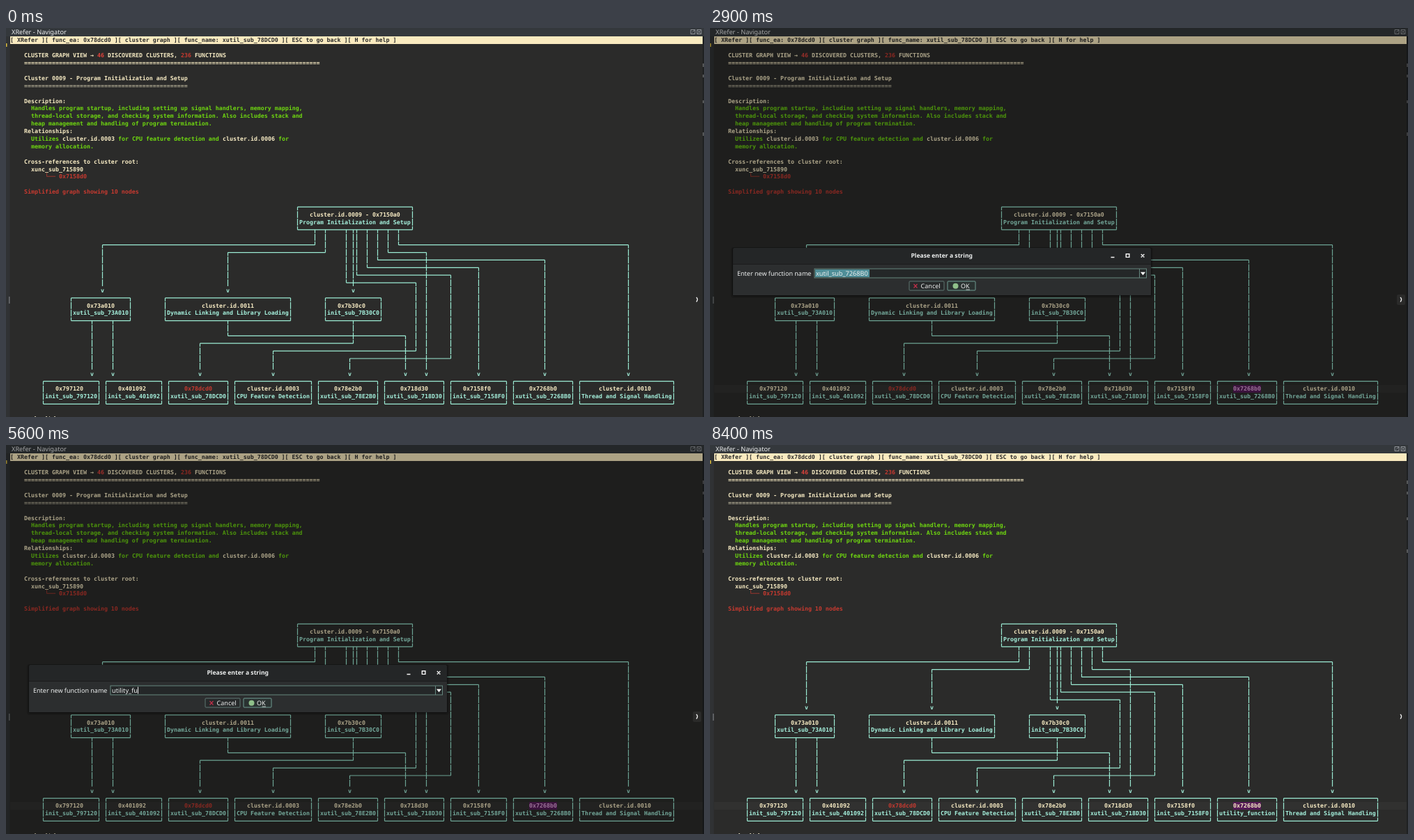
Animation of 1002x559 px, one loop 8.8 s. Source, as an HTML page:

```html
<!DOCTYPE html>
<html lang="en">
<head>
<meta charset="utf-8">
<title>Cluster graph rename</title>
<style>
html, body { margin: 0; width: 100%; height: 100%; overflow: hidden; background: #2b2b2a; }
svg { display: block; width: 1002px; height: 559px; }
text { white-space: pre; }
.mono { font: bold 8.305px "DejaVu Sans Mono", monospace; text-rendering: geometricPrecision; }
.ui { font: 9px "Noto Sans", sans-serif; fill: #eef0f0; text-rendering: geometricPrecision; }
.field { font-size: 9.2px; }
.heading { font-size: 8.6px; font-weight: bold; }
.cream { fill: #f8ecc4; }
.rule { fill: #b5af98; }
.green { fill: #6fd810; }
.red { fill: #c73a30; }
.alert { fill: #e0433c; }
.dark { fill: #2b2b2a; }
.mint { fill: #a6f2de; }
</style>
</head>
<body>
<svg id="stage" viewBox="0 0 1002 559" xmlns="http://www.w3.org/2000/svg">
  <rect width="1002" height="559" fill="#2b2b2a"/>
  <rect width="1002" height="12" fill="#34383c"/>
  <rect y="12" width="5.5" height="547" fill="#303234"/>
  <rect x="1000" y="12" width="2" height="547" fill="#1f2122"/>
  <rect y="22" width="1.5" height="5" fill="#d8b93c"/>
  <rect x="4" y="386" width="1.5" height="10" fill="#6c6f72"/>
  <path d="M1001 51v5M1001 67v4M1001 104v4M1001 150v5" stroke="#8b8d8e"/>
  <text class="ui field" x="8" y="9">XRefer - Navigator</text>
  <path d="M983 2.5h6v6h-6zM985 6.5l4-4M992 2.5h6v6h-6zM993 3.5l4 4M997 3.5l-4 4"
    fill="none" stroke="#a9adb0" stroke-width=".8"/>
  <rect x="6" y="12" width="994" height="11" fill="#f9eabf"/>
  <path d="M41 558.5h2M57 558.5h2M62 558.5h1M69 558.5h2" stroke="#c9c3aa"/>
  <rect id="row" x="6" y="513" width="994" height="11" fill="#313130"/>
  <rect id="mark" x="751" y="513" width="40" height="11" fill="#561c58"/>
  <path id="wires" fill="none" stroke="#9cecd4" stroke-width="1.2"/>
  <!-- The minute turn stops text from snapping to whole pixel rows. -->
  <g id="page" class="mono" transform="rotate(.002)"></g>
  <path id="beam" d="M780.8 513v11" stroke="#fff" stroke-width="1.4"/>
  <rect id="dim" width="1002" height="559"/>
  <rect x="986" y="383" width="12" height="15" rx="2" fill="#2b2b2a"/>
  <path d="M991 387q3.2 3 0 6.5" fill="none" stroke="#f2f2f2" stroke-width="1.3"/>
  <g id="dialog">
    <rect x="30" y="315" width="606" height="73" rx="4" opacity=".18"/>
    <rect x="32" y="315.5" width="602" height="70" rx="3" opacity=".3"/>
    <path d="M33 384V319q0-3 3-3h594q3 0 3 3v65z" fill="#2c2e2f"/>
    <path d="M33 339V319q0-3 3-3h594q3 0 3 3v20z" fill="#242627"/>
    <path d="M33 339.5h600" stroke="#1b1c1d"/>
    <text class="ui heading" x="332.7" y="330.3" text-anchor="middle">Please enter a string</text>
    <path d="M575.5 329.5h5M597.3 324.8h4.6v4.6h-4.6zM618.8 325l4.6 4.6M623.4 325l-4.6 4.6"
      fill="none" stroke="#f5f5f5" stroke-width="1.4"/>
    <text class="ui" x="39" y="356">Enter new function name</text>
    <rect x="150" y="346" width="476.5" height="13" fill="#242728" stroke="#66877f"/>
    <path d="M616.5 346v13" stroke="#66877f"/>
    <path d="M618 350.7h7l-3.5 4.6z" fill="#fff"/>
    <rect id="selection" x="151" y="347" width="78" height="11" fill="#4f8e98"/>
    <text id="entry" class="ui field" x="152" y="356"></text>
    <path id="caret" d="M0 347.5v10" stroke="#fff" stroke-width=".9"/>
    <rect x="286" y="364" width="50" height="13" rx="1" fill="#272a2b" stroke="#5f7773"/>
    <rect x="341" y="364" width="40" height="13" rx="1" fill="#2a3231" stroke="#6f9c92"/>
    <path d="M292.5 368l5 5.5M297.5 368l-5 5.5" stroke="#c2304a" stroke-width="1.2"/>
    <circle cx="352.5" cy="370.7" r="4" fill="#8fc08a"/>
    <text class="ui" x="302.6" y="374.4">Cancel</text>
    <text class="ui" x="360" y="374.4">OK</text>
    <path d="M367.5 376h5.5" stroke="#eef0f0" stroke-width=".8"/>
  </g>
</svg>
<script>
const LOOP = 8800;
const $ = id => document.getElementById(id);
const page = $("page");

// Text and lines share a character grid.
const CELL = 5, LINE = 10.89, BASE = 42.2;

function put(row, col, string, style) {
  const el = document.createElementNS("http://www.w3.org/2000/svg", "text");
  el.setAttribute("x", 6 + CELL * col);
  el.setAttribute("y", (BASE + LINE * row).toFixed(2));
  el.setAttribute("class", style);
  el.textContent = string;
  page.append(el);
  return el;
}

// Consecutive pieces of one row: string, style, string, style ...
function putRun(row, col, ...pieces) {
  for (let i = 0; i < pieces.length; i += 2) {
    put(row, col, pieces[i], pieces[i + 1]);
    col += pieces[i].length;
  }
}

put(-2, 0, "[ XRefer ][ func_ea: 0x78dcd0 ][ cluster graph ][ func_name: xutil_sub_78DCD0 ][ ESC to go back ][ H for help ]", "dark");
putRun(0, 4, "CLUSTER GRAPH VIEW → ", "cream", "46", "alert", " DISCOVERED CLUSTERS, ", "cream", "236", "red", " FUNCTIONS", "cream");
put(1, 4, "=".repeat(85), "cream");
put(3, 4, "Cluster 0009 - Program Initialization and Setup", "cream");
put(4, 4, "=".repeat(47), "rule");
put(6, 4, "Description:", "cream");
put(7, 6, "Handles program startup, including setting up signal handlers, memory mapping,", "green");
put(8, 6, "thread-local storage, and checking system information. Also includes stack and", "green");
put(9, 6, "heap management and handling of program termination.", "green");
put(10, 4, "Relationships:", "cream");
putRun(11, 6, "Utilizes ", "green", "cluster.id.0003", "cream", " for CPU feature detection and ", "green", "cluster.id.0006", "cream", " for", "green");
put(12, 6, "memory allocation.", "green");
put(14, 4, "Cross-references to cluster root:", "cream");
put(15, 6, "xunc_sub_715890", "cream");
put(16, 10, "└── 0x7158d0", "red");
put(18, 4, "Simplified graph showing 10 nodes", "red");

// Each cell holds the sides its line touches.
const UP = 1, RIGHT = 2, DOWN = 4, LEFT = 8;
const cells = Array.from({ length: 47 }, () => new Array(200).fill(0));

function stroke(r0, c0, r1, c1) {
  const dr = Math.sign(r1 - r0), dc = Math.sign(c1 - c0);
  const [out, back] = dr ? (dr > 0 ? [DOWN, UP] : [UP, DOWN])
    : (dc > 0 ? [RIGHT, LEFT] : [LEFT, RIGHT]);
  for (let r = r0, c = c0; r !== r1 || c !== c1;) {
    cells[r][c] |= out;
    r += dr;
    c += dc;
    cells[r][c] |= back;
  }
}

function box(row, left, head, name) {
  const right = left + name.length + 1;
  stroke(row, left, row, right);
  stroke(row, right, row + 3, right);
  stroke(row + 3, right, row + 3, left);
  stroke(row + 3, left, row, left);
  const pad = Math.floor((name.length - head.length) / 2);
  return [
    put(row + 1, left + 1 + pad, head, head === "0x78dcd0" ? "red" : "cream"),
    put(row + 2, left + 1, name, "mint")
  ];
}

// Start column and row, then alternating target rows and columns.
function route(col, row, ...turns) {
  turns.forEach((turn, i) => {
    if (i % 2) { stroke(row, col, row, turn); col = turn; }
    else { stroke(row, col, turn, col); row = turn; }
  });
  cells[row][col] = 0;
  put(row, col, "v", "mint");
}

box(20, 82, "cluster.id.0009 - 0x7150a0", "Program Initialization and Setup");
box(32, 17, "0x73a010", "xutil_sub_73A010");
box(32, 44, "cluster.id.0011", "Dynamic Linking and Library Loading");
box(32, 90, "0x7b30c0", "init_sub_7B30C0");
box(43, 9, "0x797120", "init_sub_797120");
box(43, 27, "0x401092", "init_sub_401092");
box(43, 45, "0x78dcd0", "xutil_sub_78DCD0");
box(43, 64, "cluster.id.0003", "CPU Feature Detection");
box(43, 88, "0x78e2b0", "xutil_sub_78E2B0");
box(43, 107, "0x718d30", "xutil_sub_718D30");
box(43, 126, "0x7158f0", "init_sub_7158F0");
const [address, label] = box(43, 144, "0x7268b0", "xutil_sub_7268B0");
box(43, 163, "cluster.id.0010", "Thread and Signal Handling");

[
  [87, 23, 25, 26, 31],
  [90, 23, 26, 62, 31],
  [96, 23, 30, 116, 39, 75, 42],
  [98, 23, 31],
  [99, 23, 29, 126, 40, 97, 42],
  [102, 23, 28, 134, 42],
  [105, 23, 27, 153, 42],
  [108, 23, 26, 119, 42],
  [111, 23, 25, 177, 42],
  [23, 35, 42],
  [29, 35, 42],
  [62, 35, 37, 113, 42],
  [98, 35, 38, 54, 42]
].forEach(r => route(...r));

// Vertical arms fall short of the row height, which leaves small gaps.
const ARMS = [[UP, "v-4.9"], [RIGHT, "h2.5"], [DOWN, "v4.9"], [LEFT, "h-2.5"]];
let wires = "";
cells.forEach((cols, row) => cols.forEach((sides, col) => {
  const x = 6 + CELL * (col + .5), y = (BASE - 2.8 + LINE * row).toFixed(2);
  for (const [side, arm] of ARMS) if (sides & side) wires += `M${x} ${y}${arm}`;
}));
$("wires").setAttribute("d", wires);

const OLD = "xutil_sub_7268B0", NEW = "utility_function";
const CLICK = 1200, OPEN = 2300, CLOSE = 7000, RENAME = 7100;
// Time and number of typed letters; -1 keeps the old name selected.
const TYPING = [[0, -1], [4100, 1], [4300, 4], [4400, 6], [4500, 7], [5300, 8]];
for (let i = 0; i < 8; i++) TYPING.push([5500 + 100 * i, 9 + i]);
const DIM = [[0, 0], [2300, .06], [2400, .12], [2500, .19], [2600, .26], [2700, .31],
  [7000, .2], [7100, .1], [7200, 0]];

const valueAt = (steps, t) => steps.findLast(step => step[0] <= t)[1];
const show = (el, on) => el.style.visibility = on ? "visible" : "hidden";
const write = (el, string) => { if (el.textContent !== string) el.textContent = string; };

function draw() {
  const t = performance.now() % LOOP;
  const typed = valueAt(TYPING, t), open = t >= OPEN && t < CLOSE;
  show($("row"), t >= CLICK);
  show($("mark"), t >= CLICK);
  show($("beam"), t >= CLICK && t < OPEN);
  address.style.fill = open ? "#e0a4dc" : "";
  write(label, t >= RENAME ? NEW : OLD);
  $("dim").style.opacity = valueAt(DIM, t);
  show($("dialog"), open);
  show($("selection"), open && typed < 0);
  show($("caret"), open && typed >= 0);
  write($("entry"), typed < 0 ? OLD : NEW.slice(0, typed));
  $("caret").setAttribute("transform", `translate(${152.5 + $("entry").getComputedTextLength()})`);
  requestAnimationFrame(draw);
}
draw();
</script>
</body>
</html>
```
